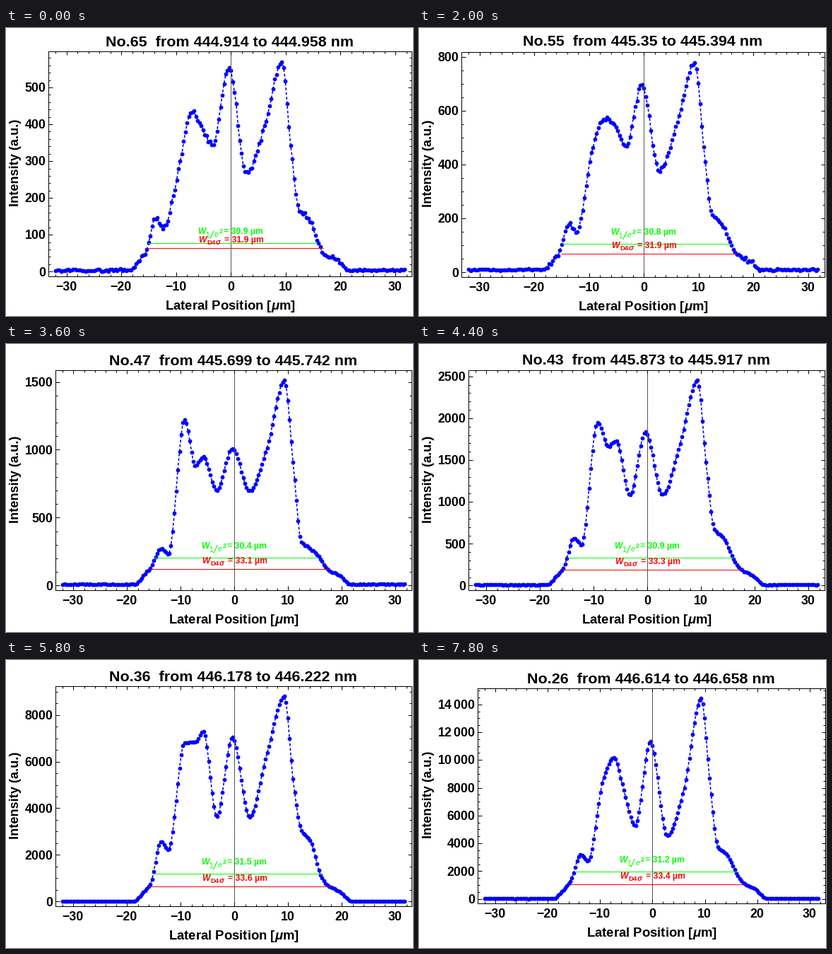
Write a matplotlib script that moves like this. It is 576 px wide and 407 px high and loops after 8000 ms.

```python
import numpy as np
import matplotlib.pyplot as plt
from matplotlib.animation import FuncAnimation

W, H, DPI = 576, 407, 100
FRAMES, STEP_MS = 40, 200
FIRST, START_NM, STEP_NM = 65, 444.914, 0.0436
E2 = np.exp(-2)

plt.rcParams.update({
    "font.family": "Liberation Sans",
    "font.weight": "bold",
    "mathtext.fontset": "custom",
    "mathtext.rm": "Liberation Sans:bold",
    "mathtext.it": "Liberation Sans:italic:bold",
})

X = (np.arange(200) - 100) * 0.32

# scan: peak, both widths, then relative heights of the skirt, the three
# points of the left lobe, and valley, centre, valley, right shoulder
KEYS = {
    65: (570, 30.9, 31.9, .25, .52, .76, .71, .60, .98, .47, .68),
    60: (614, 30.9, 31.8, .24, .56, .765, .72, .61, .98, .515, .69),
    55: (780, 30.8, 31.9, .23, .60, .73, .72, .60, .895, .485, .71),
    47: (1512, 30.4, 33.1, .18, .81, .585, .625, .465, .67, .46, .665),
    40: (3530, 31.2, 33.4, .27, .785, .75, .765, .42, .81, .43, .70),
    31: (27550, 31.9, 33.9, .32, .76, .81, .91, .405, .79, .39, .74),
    26: (14450, 31.2, 33.4, .22, .605, .705, .575, .365, .785, .315, .545),
}


def scan(no):
    """Values of one scan; the peak grows geometrically between keys."""
    nos = sorted(KEYS)
    cols = np.array([KEYS[n] for n in nos]).T
    peak = np.exp(np.interp(no, nos, np.log(cols[0])))
    return peak, *(np.interp(no, nos, c) for c in cols[1:])


def smooth(px, py, x):
    """Monotone cubic through the turning points, flat at each extreme."""
    d = np.diff(py) / np.diff(px)
    a, b = d[:-1], d[1:]
    same = a * b > 0
    inner = np.where(same, 2 * a * b / np.where(same, a + b, 1), 0)
    m = np.concatenate([[0], inner, [0]])
    x = np.clip(x, px[0], px[-1])
    i = np.clip(np.searchsorted(px, x) - 1, 0, len(d) - 1)
    w = px[i + 1] - px[i]
    t = (x - px[i]) / w
    s = t * t * (3 - 2 * t)
    return (py[i] + (py[i + 1] - py[i]) * s
            + w * t * (1 - t) * (m[i] * (1 - t) - m[i + 1] * t))


def profile(skirt, left, mid, right, v1, centre, v2, shoulder):
    points = np.array([
        (-19, 0), (-17, .045), (-15.6, .09), (-13.7, skirt),
        (-12.3, .86 * skirt), (-9.3, left), (-7.3, mid), (-5.8, right),
        (-3.3, v1), (-.4, centre), (2.8, v2), (6, shoulder), (9.28, 1),
        (11, .57), (12.4, 1.2 * skirt), (14.2, skirt), (16, .13),
        (17.3, .08), (19.5, .05), (22, 0)])
    return smooth(*points.T, X)


def nice_step(span):
    """Smallest 1-2-5 step giving at most eight divisions, and its parts."""
    for power in range(1, 6):
        for base, parts in ((1, 5), (2, 4), (5, 5)):
            step = base * 10 ** power
            if span / step <= 8:
                return step, parts


def number(v):
    return rf"${v // 1000}\,{v % 1000:03d}$" if v >= 10000 else str(v)


def nm(v):
    return f"{v:.3f}".rstrip("0").rstrip(".")


fig = plt.figure(figsize=(W / DPI, H / DPI), dpi=DPI, facecolor="white")
ax = fig.add_axes([0, 0, 1, 1])


def text(x, y, s, px, **kw):
    kw.setdefault("va", "baseline")
    ax.text(x, y, s, fontsize=px * 72 / DPI, zorder=6, **kw)


def line(x0, y0, x1, y1, color):
    ax.plot([x0, x1], [y0, y1], color=color, lw=0.72, zorder=3,
            solid_capstyle="butt")


def ticks(at, lo, hi, size, draw_lines):
    for a, b in ((lo, lo + size), (hi - size, hi)):
        draw_lines(at, a, b, colors="black", lw=0.72, zorder=4)


def width_label(x, y, value, color, parts):
    text(x, y, "W", 12, color=color, style="italic")
    for dx, dy, s, px, style, weight in parts:
        text(x + dx, y + dy, s, px, color=color, style=style, weight=weight)
    text(x + 37, y, f"= {value:.1f} µm", 12.2, color=color)


E2_PARTS = [(10.5, 5.5, "1", 10, "normal", "normal"),
            (17, 7, "/", 16, "italic", "normal"),
            (23.5, 4.5, "e", 11, "italic", "normal"),
            (30, -0.5, "2", 9, "normal", "bold")]
D4_PARTS = [(11.5, 2.5, "D4", 9.5, "normal", "bold"),
            (24, 2.5, "σ", 10.5, "italic", "bold")]


def draw(frame):
    ax.clear()
    ax.set_xlim(0, W)
    ax.set_ylim(H, 0)
    ax.axis("off")

    no = FIRST - frame
    peak, w_e2, w_d4, *heights = scan(no)
    shape = profile(*heights)

    # detector noise: part fixed per pixel, part new in every scan
    fixed = np.random.default_rng(7).normal(size=X.size)
    fresh = np.random.default_rng(no).normal(size=X.size)
    noise = 0.6 * (fixed + fresh) * np.where(shape > 0.03, 4.5, 2.2)
    floor = 4 + 6 * min(frame / 10, 1)
    data = np.clip(np.maximum(peak * shape, floor) + noise, 0.5, peak)

    # layout follows the widest tick label
    step, parts = nice_step(1.07 * peak)
    values = range(0, int(1.05 * peak) + 1, step)
    digits = len(str(values[-1]))
    left, right, top = {3: (60.2, 574.2, 32.7), 4: (70.2, 574.2, 36.7),
                        5: (83.2, 575.2, 39.7)}[digits]
    height = round((right - left) / 1.618)
    k = height / 1.0715 / peak
    push = max(0, 11 - k * (1.05 * peak - values[-1]))
    title_y = top - 6.7 - 0.3 * push
    top += int(0.45 * push)
    bottom = top + height
    zero = top + 1.05 * peak * k
    sx = (right - left) / 66.3
    mid = (left + right) / 2
    cx = mid + 0.16 * sx

    # frame and ticks
    ax.plot([left, right, right, left, left], [top, top, bottom, bottom, top],
            color="black", lw=0.72, zorder=4)
    small = np.arange(0, 1.05 * peak, step / parts)
    ticks(zero - k * small, left, right, 3, ax.hlines)
    ticks(zero - k * np.array(values), left, right, 5.5, ax.hlines)
    ticks(cx + sx * np.arange(-32, 33, 2), top, bottom, 3, ax.vlines)
    ticks(cx + sx * np.arange(-30, 31, 10), top, bottom, 5.5, ax.vlines)
    for v in values:
        text(left - 3.7, zero - k * v + 6.2, number(v), 17.8, ha="right")
    for v in range(-30, 31, 10):
        text(cx + sx * v - 0.5, bottom + 20, str(v).replace("-", "−"), 17.8,
             ha="center")

    # profile
    ax.plot(cx + sx * X, zero - k * data, color="blue", lw=1.15,
            ls=(0, (2.4, 1.7)), marker="o", ms=5.8 * 72 / DPI, mew=0, zorder=2)
    axis_x = np.floor(cx) + 0.2
    line(axis_x, top, axis_x, bottom, "#555555")

    # widths
    x0 = X[np.argmax(shape > E2)] - 0.16
    red = 0.07 + 0.042 * np.exp(-frame / 12)
    y_e2, y_d4 = zero - k * peak * E2, zero - k * peak * red
    line(cx + sx * x0, y_e2, cx + sx * (x0 + w_e2), y_e2, "#00ff00")
    line(cx + sx * (0.85 - w_d4 / 2), y_d4, cx + sx * (0.85 + w_d4 / 2), y_d4,
         "red")
    width_label(cx - 47, y_e2 - 13.5, w_e2, "#00ff00", E2_PARTS)
    width_label(cx - 46, y_d4 - 8, w_d4, "red", D4_PARTS)

    # titles
    lo = START_NM + STEP_NM * frame
    text(mid - 0.5, title_y, f"No.{no}  from {nm(lo)} to {nm(lo + STEP_NM)} nm",
         21.5, ha="center")
    text(mid, bottom + 47, r"Lateral Position [$\mu$m]", 18.5, ha="center")
    text(22.3, (top + bottom) / 2 - 1, "Intensity (a.u.)", 18.2, rotation=90,
         ha="right", va="center")
    return []


anim = FuncAnimation(fig, draw, frames=FRAMES, interval=STEP_MS, repeat=True,
                     repeat_delay=0, init_func=lambda: [], blit=False)
plt.show()
```
